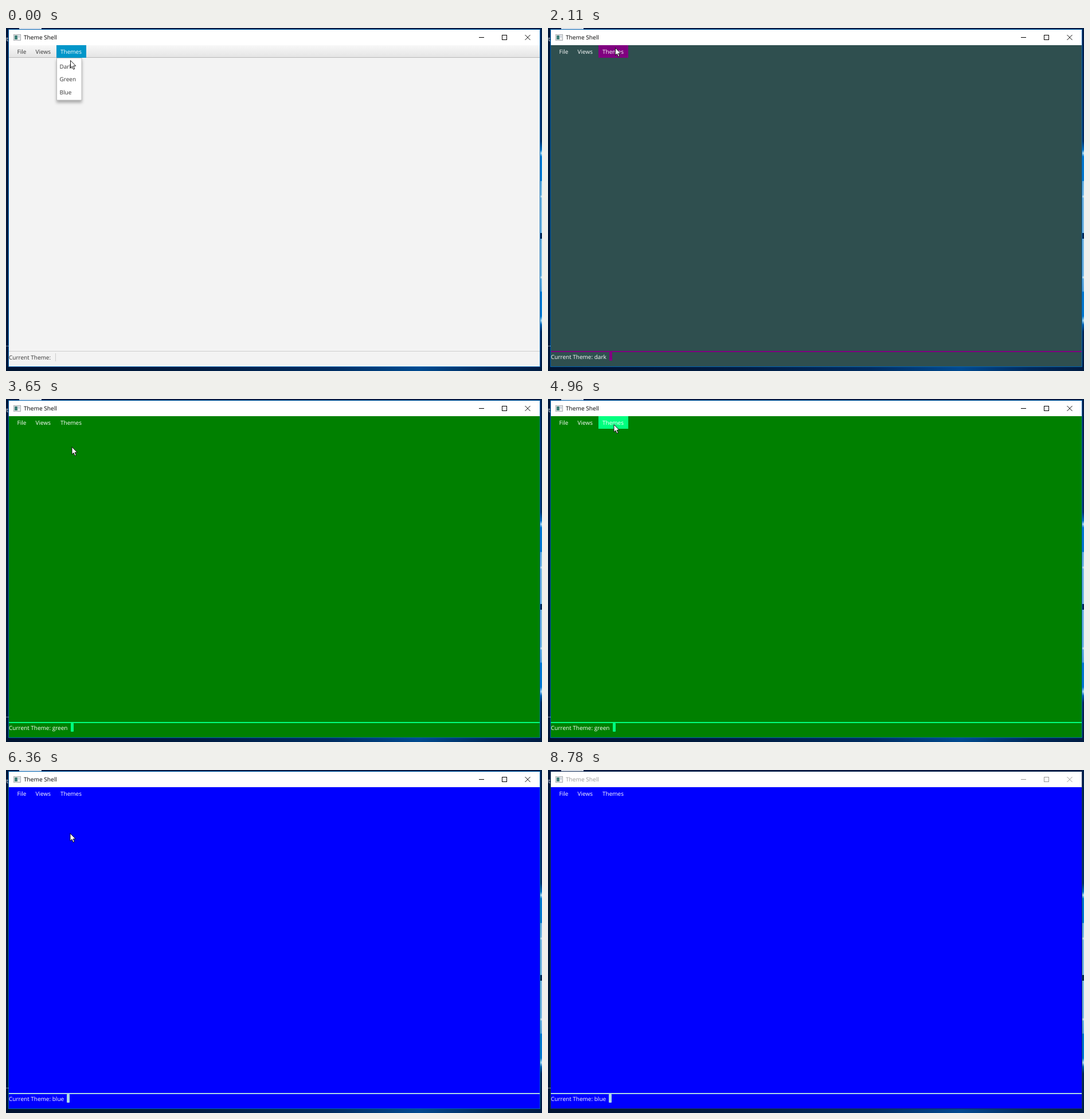
Animation of 935 by 599 pixels, one loop 8.88 s. Source, as an HTML page:

```html
<!DOCTYPE html>
<html lang="en">
<head>
<meta charset="utf-8">
<title>Theme Shell</title>
<style>
  html, body { margin: 0; width: 100%; height: 100%; overflow: hidden; background: #00173a; }
  svg { display: block; width: 935px; height: 599px; }
  text { font: 10px "Open Sans", "Noto Sans", sans-serif; text-rendering: geometricPrecision; white-space: pre; }
  .icon { fill: none; stroke: var(--title); shape-rendering: crispEdges; }
  .ink { fill: var(--ink); }
  #title { font-size: 10.15px; fill: var(--title); }
  #panel { fill: var(--panel); stroke: var(--edge); filter: drop-shadow(0 4px 2.5px rgba(0, 0, 0, .3)); }
  .accent { fill: var(--accent); }
</style>
</head>
<body>
<svg viewBox="0 0 935 599">
  <defs>
    <linearGradient id="glow">
      <stop offset="0" stop-color="#001431"/>
      <stop offset=".35" stop-color="#001c42"/>
      <stop offset=".6" stop-color="#002c60"/>
      <stop offset=".77" stop-color="#004a90"/>
      <stop offset=".9" stop-color="#002a5c"/>
      <stop offset="1" stop-color="#001c42"/>
    </linearGradient>
    <linearGradient id="light" x2="0" y2="1">
      <stop offset="0" stop-color="#00204a"/>
      <stop offset=".33" stop-color="#003068"/>
      <stop offset=".355" stop-color="#0070c4"/>
      <stop offset=".365" stop-color="#a8daf4"/>
      <stop offset=".375" stop-color="#0078d0"/>
      <stop offset=".445" stop-color="#0078d0"/>
      <stop offset=".447" stop-color="#68b0e0"/>
      <stop offset=".487" stop-color="#78b8e2"/>
      <stop offset=".491" stop-color="#c8e4f2"/>
      <stop offset=".496" stop-color="#78b8e2"/>
      <stop offset=".722" stop-color="#78b8e2"/>
      <stop offset=".727" stop-color="#c8e4f2"/>
      <stop offset=".732" stop-color="#68b0e0"/>
      <stop offset=".767" stop-color="#58a4dc"/>
      <stop offset=".77" stop-color="#0078d0"/>
      <stop offset=".84" stop-color="#0078d0"/>
      <stop offset=".853" stop-color="#a8daf4"/>
      <stop offset=".865" stop-color="#0060b0"/>
      <stop offset=".885" stop-color="#00285a"/>
      <stop offset="1" stop-color="#001c42"/>
    </linearGradient>
    <linearGradient id="bar" x2="0" y2="1">
      <stop offset="0" stop-color="#f8f8f8"/>
      <stop offset="1" stop-color="#e3e3e3"/>
    </linearGradient>
  </defs>

  <!-- desktop -->
  <rect width="935" height="599" fill="#001c42"/>
  <rect width="5" height="599" fill="#00173a"/>
  <rect y="591" width="935" height="8" fill="url(#glow)"/>
  <rect x="931" width="4" height="599" fill="url(#light)"/>
  <rect x="931" y="358" width="4" height="10" fill="#002a58"/>
  <rect x="23" width="39" height="2" fill="#dfe3ea"/>
  <text x="-5" y="23" fill="#fff">at</text>
  <text x="-3" y="556" fill="#fff">...</text>

  <!-- window -->
  <rect id="frame" x="4.5" y="2.5" width="927" height="589" fill="#fff"/>
  <rect x="13.5" y="11.5" width="12" height="10" fill="#f0f0f0" stroke="#a4a9ae"/>
  <rect x="15" y="13" width="5" height="7" fill="#3f7f78"/>
  <rect x="21" y="13" width="3" height="4" fill="#c9d3dc"/>
  <text id="title" x="31" y="20">Theme Shell</text>
  <path class="icon" d="M825 16.5h9M865.5 12.5h8v8h-8z"/>
  <path class="icon" style="shape-rendering:auto" d="M905.5 12l9 9m0-9l-9 9"/>
  <rect x="5" y="30" width="926" height="561" style="fill:var(--page)"/>
  <g id="lightBar">
    <rect x="5" y="30" width="926" height="22" fill="url(#bar)"/>
    <rect x="5" y="51" width="926" height="1" fill="#b8b8b8"/>
    <rect x="5" y="564" width="926" height="1" fill="#cdcdcd"/>
    <rect x="86" y="568" width="1" height="14" fill="#cdcdcd"/>
  </g>
  <g id="themeBar" class="accent">
    <rect x="5" y="564" width="926" height="2"/>
    <rect id="mark" y="566" width="5" height="15" rx="1"/>
  </g>
  <text id="status" class="ink" x="5"></text>

  <!-- menu -->
  <rect id="button" class="accent" x="88" y="30" width="52" height="22"/>
  <text class="ink" x="19.5" y="45">File</text>
  <text class="ink" x="51.5" y="45">Views</text>
  <text id="themes" x="95" y="45">Themes</text>
  <g id="popup">
    <rect id="panel" x="88.5" y="52.5" width="43.5" height="73.5"/>
    <rect id="hover" class="accent" x="89" width="43" height="22.4"/>
    <text class="item" x="93.5" y="71">Dark</text>
    <text class="item" x="93.5" y="93.3">Green</text>
    <text class="item" x="93.5" y="115.6">Blue</text>
  </g>
  <path id="cursor" d="M.5 .7V13.7L3.5 10.9 5.6 16.2 7.8 15.3 5.7 10.2H9.7Z" fill="#fff" stroke="#000" stroke-width=".9"/>
</svg>
<script>
const $ = id => document.getElementById(id);
const LOOP = 8880;
const themes = [
  { name: '', page: '#f3f3f3', ink: '#333', accent: '#0096c9', panel: '#fff', edge: '#bcbcbc' },
  { name: 'dark', page: '#2f4f4f', accent: '#800080', mark: 107 },
  { name: 'green', page: '#008000', accent: '#00ff7f', mark: 113 },
  { name: 'blue', page: '#0000ff', accent: '#add8e6', mark: 106 }
];
const CLOSED = 0, BUTTON = 1, OPEN = 2, DARK = 3, GREEN = 4, BLUE = 5;

// start time, theme, menu state, pointer x and y (none: pointer hidden)
const steps = [
  [0, 0, OPEN, 112, 56],
  [130, 0, DARK, 109, 68],
  [560, 1, CLOSED, 109, 68],
  [1960, 1, BUTTON, 112, 49],
  [2110, 1, BUTTON, 117, 34],
  [2380, 1, BUTTON, 117, 36],
  [2660, 1, OPEN, 117, 36],
  [2790, 1, OPEN, 117, 52],
  [2940, 1, DARK, 115, 64],
  [3090, 1, GREEN, 114.5, 79],
  [3220, 1, GREEN, 114.5, 83],
  [3650, 2, CLOSED, 114.5, 83],
  [4400, 2, CLOSED, 114.5, 75],
  [4530, 2, CLOSED, 114.5, 67],
  [4680, 2, CLOSED, 114.5, 53],
  [4960, 2, BUTTON, 114.5, 44],
  [5240, 2, OPEN, 114.5, 44],
  [5390, 2, OPEN, 111, 51],
  [5530, 2, DARK, 110.5, 70],
  [5660, 2, GREEN, 110.5, 98],
  [5800, 2, BLUE, 110.5, 105],
  [5950, 2, BLUE, 111.5, 110],
  [6230, 2, BUTTON, 111.5, 110],
  [6360, 3, CLOSED, 111.5, 110],
  [7070, 3, CLOSED, 120.5, 116],
  [7220, 3, CLOSED, 200, 166],
  [7350, 3, CLOSED, 337, 248],
  [7500, 3, CLOSED, 536.5, 357],
  [7650, 3, CLOSED, 725, 459],
  [7780, 3, CLOSED, 903.5, 556],
  [7930, 3, CLOSED]
];
const BLUR_TIME = 8780;
const items = document.querySelectorAll('.item');

const show = (id, on) => $(id).style.display = on ? '' : 'none';
const setVar = (name, value) => document.body.style.setProperty('--' + name, value);

function paint(t) {
  const [, index, menu, x, y] = steps.findLast(s => s[0] <= t);
  const { name, page, ink = '#fff', accent, panel = page, edge = 'none', mark } = themes[index];
  const active = t < BLUR_TIME;
  const colours = { page, ink, accent, panel, edge, title: active ? '#000' : '#999' };
  for (const key in colours) setVar(key, colours[key]);
  $('frame').setAttribute('stroke', active ? '#0063b1' : '#14305a');

  show('lightBar', !name);
  show('themeBar', name);
  $('mark').setAttribute('x', mark || 0);
  $('status').textContent = 'Current Theme: ' + name;
  $('status').setAttribute('y', name ? 577.5 : 578.5);

  show('button', menu >= BUTTON);
  $('themes').style.fill = menu >= BUTTON ? '#fff' : ink;
  show('popup', menu >= OPEN);
  show('hover', menu >= DARK);
  $('hover').setAttribute('y', 56 + 22.4 * Math.max(0, menu - DARK));
  items.forEach((item, i) => item.style.fill = menu === DARK + i ? '#fff' : ink);

  show('cursor', x !== undefined);
  if (x !== undefined) $('cursor').setAttribute('transform', `translate(${x} ${y})`);
}

let start;
function tick(now) {
  start ??= now;
  paint((now - start) % LOOP);
  requestAnimationFrame(tick);
}
paint(0);
requestAnimationFrame(tick);
</script>
</body>
</html>
```
